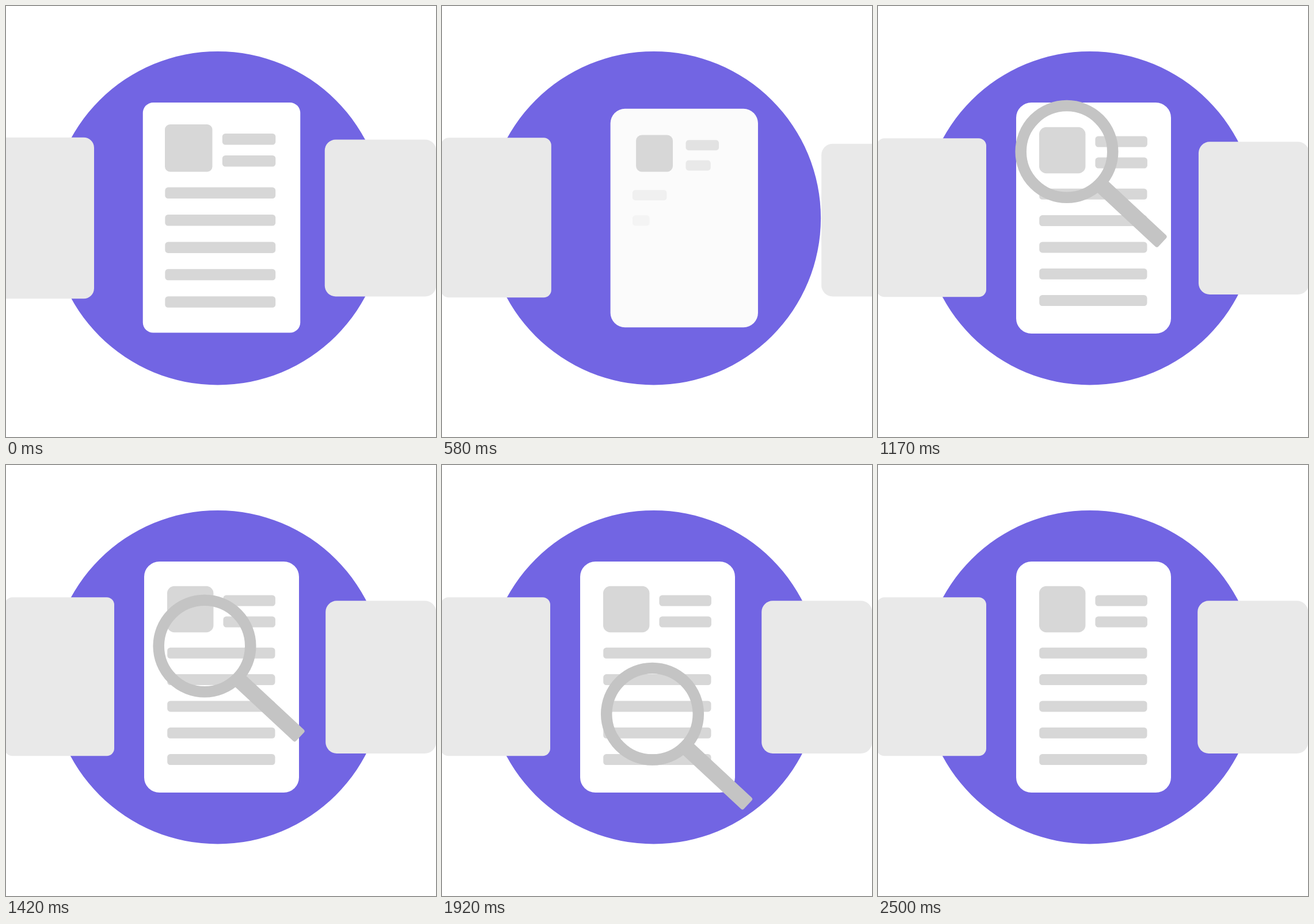
An HTML page with a canvas for the animation above (3 s loop, 747 by 750 pixels).

```html
<!DOCTYPE html>
<html lang="en">
<head>
<meta charset="utf-8">
<title>Document scan</title>
<style>
  html, body { margin: 0; width: 100%; height: 100%; overflow: hidden; background: #fff; }
  canvas { display: block; width: 100vw; height: 100vh; }
</style>
</head>
<body>
<canvas id="stage" width="747" height="750"></canvas>
<script>
const ctx = document.getElementById('stage').getContext('2d');
const LOOP = 3000, STEP = 1000 / 24, LAST = 2500;
const ENTER = 730, SCAN = 1125, EXIT = 2167;
const INK = '#d7d7d7', LENS = '#c4c4c4', DIM = 233, WHITE = 255;

const clamp = v => Math.min(1, Math.max(0, v));
const mix = (a, b, p) => a + (b - a) * p;
const linear = (t, start, length) => clamp((t - start) / length);
const smooth = (t, start, length) => {
  const u = linear(t, start, length);
  return u * u * (3 - 2 * u);
};
const gray = v => `rgb(${[v, v, v].map(Math.round)})`;

function box(x, y, w, h, r, fill) {
  ctx.fillStyle = fill;
  ctx.beginPath();
  ctx.roundRect(x, y, w, h, r);
  ctx.fill();
}

function card(cx, cy, w, h, r, shade) {
  box(cx - w / 2, cy - h / 2, w, h, r, gray(shade));
}

// Scales the page contents about (ox, oy) and moves that point to cx
function content(ox, oy, cx, scale, paint) {
  ctx.save();
  ctx.translate(cx, oy);
  ctx.scale(scale, scale);
  ctx.translate(-ox, -oy);
  paint();
  ctx.restore();
}

// Two short bars beside the picture, then five long ones; grow(i) runs from 0 to 1
function bars(short, long, h, grow) {
  for (let i = 0; i < 7; i++) {
    const b = i < 2 ? short : long, row = i < 2 ? i : i - 2;
    const p = grow(i);
    if (!p) continue;
    ctx.globalAlpha *= p;
    box(b.x, b.y + row * b.gap, b.w * p, h, 5.3, INK);
    ctx.globalAlpha /= p;
  }
}

function oldPage(t) {
  const move = smooth(t, 83, 520), size = smooth(t, 131, 488), tone = smooth(t, 71, 490);
  card(mix(374.5, 93, move), 368.3, mix(273.5, 190, size), mix(400.5, 276, size),
    mix(18, 13, size), mix(WHITE, DIM, tone));

  const alpha = 1 - linear(t, 335, 210);
  if (!alpha) return;
  content(372, 365.5, 372 - 291 * move, 1 - 0.257 * size, () => {
    ctx.globalAlpha = alpha;
    box(276, 206, 82.5, 82.5, 9, INK);
    bars({ x: 375.8, y: 222, w: 92.5, gap: 38 },
      { x: 276.3, y: 315.6, w: 191.9, gap: 47.4 }, 19.5, () => 1);
  });
}

function newPage(t) {
  const p = smooth(t, 55, 714);
  const w = mix(193.5, 269, p), cx = mix(650.5, 374.5, p);
  card(cx, 369, w, mix(273, 402, p), mix(19, 26.5, p), mix(DIM, WHITE, p));

  const grow = i => linear(t, (10 + i) * STEP, 6 * STEP);
  content(374.5, 369, cx, w / 269, () => {
    const side = 80.5 * grow(-1);
    box(320.2 - side / 2, 251 - side / 2, side, side, side * 0.155, INK);
    bars({ x: 377.4, y: 226.5, w: 90.5, gap: 37 },
      { x: 280.2, y: 317.8, w: 187.3, gap: 46.3 }, 19, grow);
  });
}

function nextPage(t) {
  const left = Math.max(0, 1253 - t) / 670;
  const d = left * left;
  card(651.2 + 104 * d, 369.1 + 3.5 * d, 192, 265.6, 19.5, DIM);
}

// Swings in from the right, scans down in a shallow arc, leaves to the right
function lensAt(t) {
  const p = (mix(SCAN, EXIT, linear(t, SCAN, EXIT - SCAN)) - 1167) / 1000;
  const near = 1 - linear(t, ENTER, SCAN - ENTER);
  const away = linear(t, EXIT, LAST - EXIT);
  const come = near * near, go = away * away;
  return [
    328 + 77 * p - 36 * p * p + 540 * come + 500 * go,
    253.5 + 249.5 * p - 13 * p * p + 270 * come + 90 * go
  ];
}

function lens(t) {
  if (t < ENTER || t > LAST - 5) return;
  ctx.save();
  ctx.translate(...lensAt(t));
  ctx.strokeStyle = LENS;
  ctx.lineWidth = 19.5;
  ctx.beginPath();
  ctx.arc(0, 0, 79.8, 0, 7);
  ctx.stroke();
  ctx.rotate(43 * Math.PI / 180);
  box(78, -11.3, 151, 27.2, 4, LENS);
  ctx.restore();
}

function draw(t) {
  ctx.fillStyle = '#fff';
  ctx.fillRect(0, 0, 747, 750);
  ctx.fillStyle = '#7265e3';
  ctx.beginPath();
  ctx.arc(367.8, 369.2, 290.3, 0, 7);
  ctx.fill();

  card(53 - 300 * smooth(t, 0, 540), 369, 200, 280.5, 18, DIM);
  nextPage(t);
  oldPage(t);
  newPage(t);
  lens(t);
}

function tick() {
  const t = performance.now() % LOOP;
  draw(Math.min(LAST, Math.floor((t + 4) / STEP) * STEP));
  requestAnimationFrame(tick);
}
tick();
</script>
</body>
</html>
```
